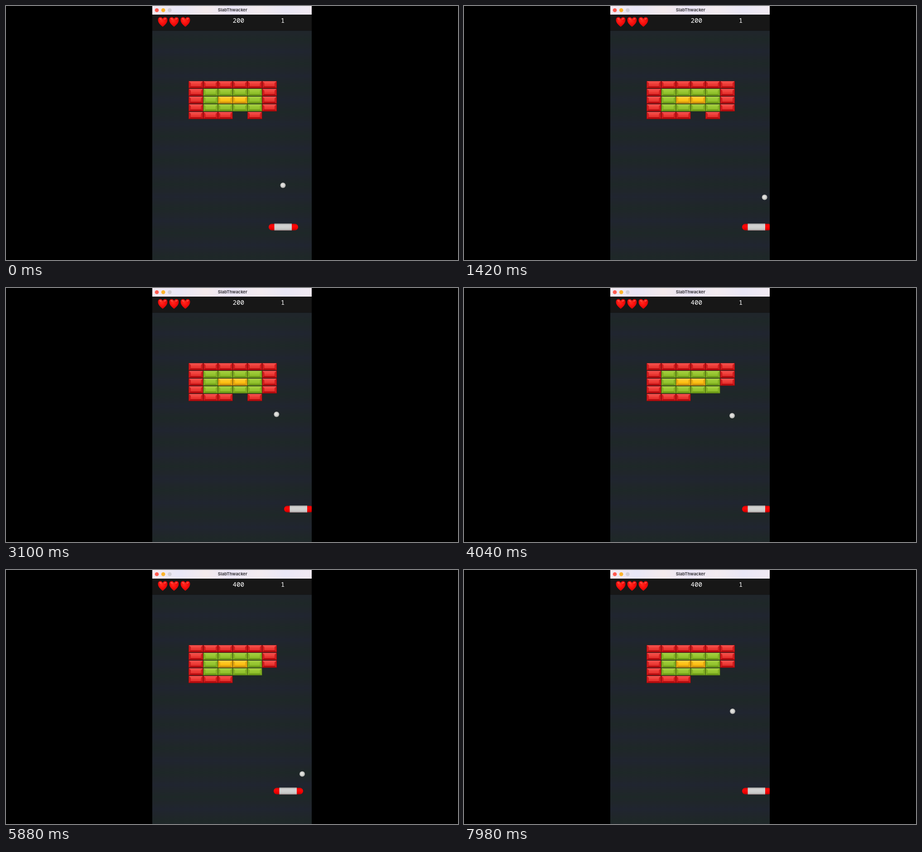
Write an HTML page with a canvas that moves like this. It is 998 px wide and 561 px high and loops after 8000 ms.

```html
<!DOCTYPE html>
<html lang="en">
<head>
<meta charset="utf-8">
<title>SlabThwacker</title>
<style>
  html, body { margin: 0; width: 100%; height: 100%; overflow: hidden; background: #000; }
  canvas { display: block; }
</style>
</head>
<body>
<canvas id="stage" width="998" height="561"></canvas>
<script>
const ctx = document.getElementById('stage').getContext('2d');
const LOOP = 8000;
const WIN = { left: 323, right: 675, width: 352, bar: 19, hud: 54.5, height: 561 };

// Keys are [step, x, y]; the ball runs straight between bounces.
const BALL = [
  [0, 611.5, 396], [17, 633, 470.5], [18, 634.2, 474.5], [34, 670.5, 410.5],
  [49, 637, 351], [76, 577.5, 243], [78, 573.5, 251], [86, 592, 282],
  [101, 626, 341], [119, 670.5, 419], [126, 654, 450.5], [132.3, 639.5, 475.5],
  [171, 593, 312]
];
const PADDLE = [
  [0, 580], [14, 580], [20, 614], [88, 614], [96, 568], [122, 568], [130, 614], [171, 614]
];

// r = red, g = green, y = yellow; 1 and 2 are red bricks that break at these steps.
const ROWS = ['rrrrrr', 'rggggr', 'rgyygr', 'rgggg1', 'rrr 2 '];
const BREAK = { 1: 76, 2: 78 };
const SKINS = {
  r: { edge: '#8d0809', top: '#f5524e', side: '#cf1b1d', bottom: '#b60c0f', face: '#e93531', shine: '#f1453f' },
  g: { edge: '#4b6a12', top: '#a6cf42', side: '#82b023', bottom: '#6d9b18', face: '#92c22d', shine: '#9bca36' },
  y: { edge: '#94690b', top: '#ffd13c', side: '#e9a90f', bottom: '#cf920b', face: '#fbbd13', shine: '#ffc723' }
};

// Steps come in uneven beats of 20, 20 and 100 ms, with one extra short step at 4640 ms.
const beats = t => 3 * Math.floor(t / 140) + Math.min(2, Math.floor(t % 140 / 20));
const stepAt = t => t < 4660 ? beats(t + 20) - 1 : beats(t);

function sample(keys, step) {
  let i = 1;
  while (i < keys.length - 1 && step > keys[i][0]) i++;
  const a = keys[i - 1], b = keys[i];
  const p = (step - a[0]) / (b[0] - a[0]);
  return a.slice(1).map((v, k) => v + (b[k + 1] - v) * p);
}

function rect(x, y, w, h, fill) {
  ctx.fillStyle = fill;
  ctx.fillRect(x, y, w, h);
}

function circle(x, y, r, fill) {
  ctx.fillStyle = fill;
  ctx.beginPath();
  ctx.arc(x, y, r, 0, 2 * Math.PI);
  ctx.fill();
}

function polygon(fill, ...points) {
  ctx.fillStyle = fill;
  ctx.beginPath();
  points.forEach(p => ctx.lineTo(...p));
  ctx.fill();
}

function withStops(gradient, ...colors) {
  colors.forEach((c, i) => gradient.addColorStop(i / (colors.length - 1), c));
  return gradient;
}

const down = (y1, y2, ...colors) => withStops(ctx.createLinearGradient(0, y1, 0, y2), ...colors);
const across = (x1, x2, ...colors) => withStops(ctx.createLinearGradient(x1, 0, x2, 0), ...colors);

function text(str, x, y, font, fill, align) {
  ctx.font = font;
  ctx.fillStyle = fill;
  ctx.textAlign = align;
  ctx.fillText(str, x, y);
}

function heart(x, y) {
  ctx.save();
  ctx.translate(x, y);
  ctx.beginPath();
  ctx.moveTo(0, 11);
  ctx.bezierCurveTo(-4, 8, -10.5, 2.5, -10.5, -4.5);
  ctx.bezierCurveTo(-10.5, -11.5, -2.5, -12.5, 0, -6.5);
  ctx.bezierCurveTo(2.5, -12.5, 10.5, -11.5, 10.5, -4.5);
  ctx.bezierCurveTo(10.5, 2.5, 4, 8, 0, 11);
  ctx.fillStyle = withStops(ctx.createRadialGradient(-3, -4, 1, 0, -1, 13), '#ff2b20', '#fa0d0b', '#bd0507');
  ctx.fill();
  ctx.fillStyle = 'rgba(255,140,125,.55)';
  for (const side of [-1, 1]) {
    ctx.beginPath();
    ctx.ellipse(side * 5.2, -6.8, 2.8, 1.3, -side * .2, 0, 2 * Math.PI);
    ctx.fill();
  }
  ctx.restore();
}

function brick(x, y, skin) {
  const w = 32.5, h = 16;
  rect(x, y, w, h, skin.edge);
  const l = x + .8, r = x + w - .8, t = y + .4, b = y + h - .7;
  const il = x + 5, ir = x + w - 5, it = y + 4, ib = y + h - 4.5;
  rect(l, t, r - l, b - t, skin.side);
  polygon(skin.top, [l, t], [r, t], [ir, it], [il, it]);
  polygon(skin.bottom, [l, b], [r, b], [ir, ib], [il, ib]);
  rect(il, it, ir - il, ib - it, skin.face);
  rect(il, it, ir - il, 3, skin.shine);
}

function paddle(x) {
  ctx.fillStyle = down(480.5, 496, '#c80505', '#ff0808', '#f20000', '#b40000');
  ctx.beginPath();
  ctx.roundRect(x, 481, 65, 14.5, 7.2);
  ctx.fill();
  rect(x + 12.5, 480.5, 38.5, 15.2, down(480.5, 495.7, '#aaa', '#d2d2d2', '#d0d0cf', '#cbcbca', '#a4a4a4'));
}

function ball(x, y) {
  circle(x, y, 6, withStops(ctx.createRadialGradient(x - 1, y - 1.2, .5, x, y, 6.2), '#e8e8e6', '#d8d8d5', '#a2a2a0'));
}

function windowFrame(score) {
  const { left, right, width, bar, hud, height } = WIN;
  rect(left, 0, width, bar, across(left, right, '#f2e9f0', '#e9e6f7', '#f4eaec', '#ebe6f7', '#f3ebef', '#eae7f6', '#f1eaf2'));
  ['#ff5a50', '#fcb42b', '#d1ced8'].forEach((c, i) => circle(333 + 14.2 * i, 9.2, 4.3, c));
  text('SlabThwacker', 500.3, 12.3, '700 9.4px Inter, sans-serif', '#3d3a40', 'center');

  rect(left, bar, width, hud - bar, '#171717');
  [346, 371, 396].forEach(x => heart(x, 35));
  const font = '500 14.2px "Noto Sans Mono", monospace';
  text(score, 500.4, 37.3, font, '#fff', 'left');
  text('1', 606.8, 37.3, font, '#fff', 'left');

  rect(left, hud, width, height - hud, '#20262b');
  for (let y = 74; y < height; y += 53.4) {
    rect(left, y - 13, width, 26, down(y - 13, y + 13, 'rgba(28,42,36,0)', 'rgba(28,42,36,.45)', 'rgba(28,42,36,0)'));
    rect(left, y + 14, width, 26, down(y + 14, y + 40, 'rgba(32,36,54,0)', 'rgba(32,36,54,.45)', 'rgba(32,36,54,0)'));
  }
}

function draw(t) {
  const step = stepAt(t);
  const broken = Object.values(BREAK).filter(s => step >= s).length;
  rect(0, 0, 998, 561, '#000');
  ctx.save();
  ctx.beginPath();
  ctx.rect(WIN.left, 0, WIN.width, WIN.height);
  ctx.clip();
  windowFrame(200 + 100 * broken);
  ROWS.forEach((row, j) => [...row].forEach((kind, i) => {
    if (kind === ' ' || step >= BREAK[kind]) return;
    brick(403 + 32.5 * i, 165.8 + 17 * j, SKINS[kind] || SKINS.r);
  }));
  paddle(...sample(PADDLE, step));
  ball(...sample(BALL, step));
  ctx.restore();
}

const start = performance.now();
function tick() {
  draw((performance.now() - start) % LOOP);
  requestAnimationFrame(tick);
}
tick();
</script>
</body>
</html>
```
